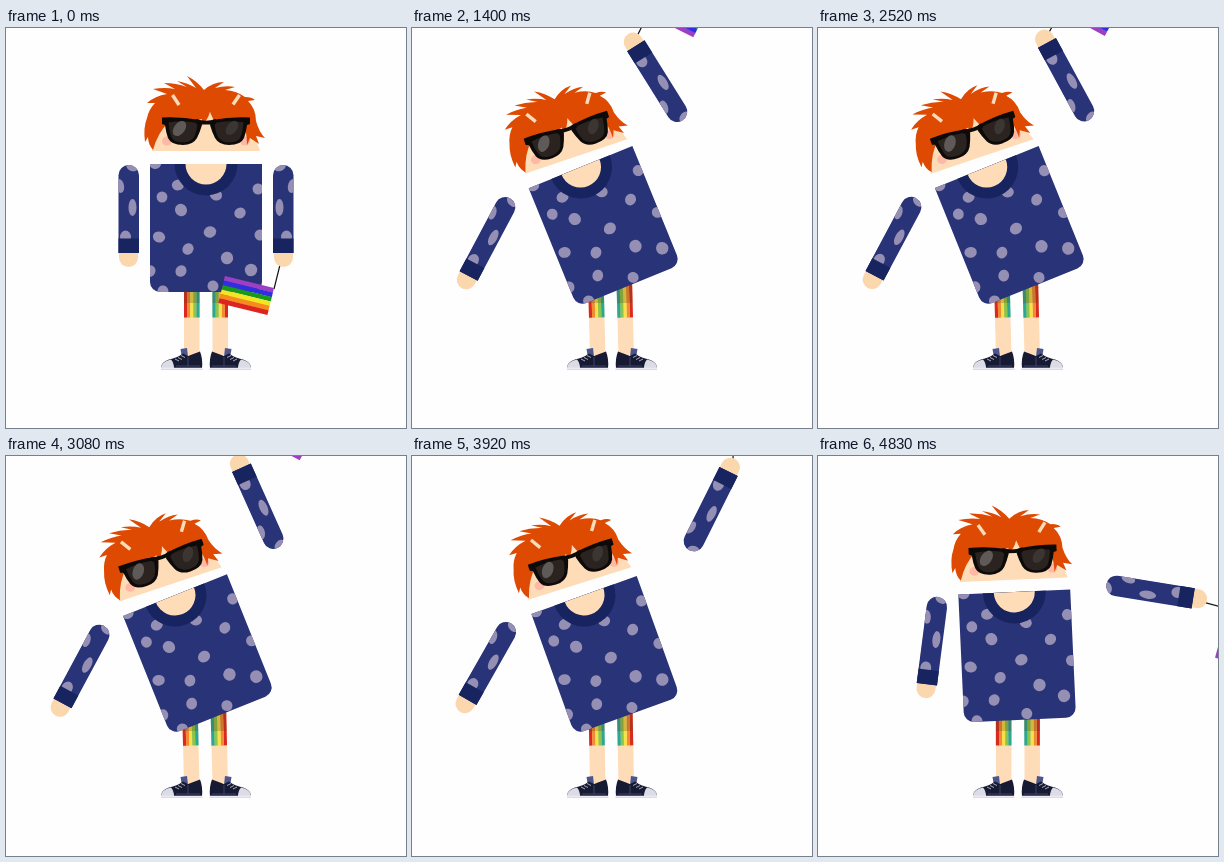
An HTML page with a canvas for the animation above (4.9 s loop, 400x400 px).

```html
<!DOCTYPE html>
<html lang="en">
<head>
<meta charset="utf-8">
<title>Flag waver</title>
<style>
html, body { margin: 0; width: 100%; height: 100%; overflow: hidden; background: #fefefe; }
canvas { display: block; width: 400px; height: 400px; }
</style>
</head>
<body>
<canvas id="stage" width="400" height="400"></canvas>
<script>
const ctx = document.getElementById('stage').getContext('2d');
const LOOP = 4900, STEP = 70;
const FIRST = 589, PERIOD = 541, LAST = FIRST + 7 * PERIOD, FLAG_LAG = 40;
const SKIN = '#ffdcb8', NAVY = '#293377', DARK = '#17245f', DOT = '#968fb4', HAIR = '#de4a02';

const clamp = x => Math.min(1, Math.max(0, x));
const ease = x => (x = clamp(x)) < 0.5 ? 4 * x ** 3 : 1 - 4 * (1 - x) ** 3;

// How far a part has left its rest pose, 0..1
const lift = (t, rise, fall) => t < LAST ? ease(t / rise) : 1 - ease((t - LAST) / fall);
const wave = t => t < FIRST || t > LAST ? 0 : (1 - Math.cos(2 * Math.PI * (t - FIRST) / PERIOD)) / 2;

function posed(px, py, dx, dy, deg, draw) {
  ctx.save();
  ctx.translate(px + dx, py + dy);
  ctx.rotate(deg * Math.PI / 180);
  ctx.translate(-px, -py);
  draw();
  ctx.restore();
}

function mirrored(draw) {
  ctx.save();
  ctx.translate(400, 0);
  ctx.scale(-1, 1);
  draw();
  ctx.restore();
}

function rect(x, y, w, h, color) {
  ctx.fillStyle = color;
  ctx.fillRect(x, y, w, h);
}

function fillPath(d, color) {
  ctx.fillStyle = color;
  ctx.fill(new Path2D(d));
}

function strokePath(d, color, width) {
  ctx.strokeStyle = color;
  ctx.lineWidth = width;
  ctx.stroke(new Path2D(d));
}

function oval(x, y, rx, ry, color, turn = 0) {
  ctx.fillStyle = color;
  ctx.beginPath();
  ctx.ellipse(x, y, rx, ry, turn, 0, 7);
  ctx.fill();
}

function box(x, y, w, h, radii) {
  ctx.beginPath();
  ctx.roundRect(x, y, w, h, radii);
}

function leg(lean) {
  posed(186, 328, 0, 0, lean, () => {
    rect(178, 255, 15.5, 72, SKIN);
    ['#d92a20', '#f08a35', '#f8e04a', '#8fc44a', '#2ba893'].forEach((color, i) =>
      rect(178 + i * 3.1, 255, 3.2, 34.5, color));
    rect(178, 255, 15.5, 20, 'rgba(90,60,20,.25)');
  });
}

function shoe() {
  fillPath('M174.5 321 L181 320 L182 329 L176 330 Z', '#4a568c');
  fillPath('M155 340 Q155 334 163 331.5 Q171 330 177 325.5 L182 328 L194 323.5 Q197 331 196 340 Z', '#171a33');
  fillPath('M155 340 Q155 333.5 165 331.5 Q168 335 168 340 Z', '#dcdce6');
  strokePath('M169 331 L173 333 M172 329.5 L176 331.5 M175 327.5 L179 329.5', '#e8e8f0', 0.7);
  strokePath('M182 329 L182 338 M170 338 L194 338', '#59618a', 0.6);
  strokePath('M155 340.3 H196.5', '#f2f0f8', 1.2);
  strokePath('M155 341.3 H196.5', '#d5c9e4', 0.9);
}

function lens() {
  fillPath(`M156 89.5 Q175 88.5 194 92 L196 97 Q194 104 191 110 Q187 117 177 117
    Q165 117 162 110 Q160 105 159 97 L156 96 Z`, '#0c0b0a');
  fillPath(`M162.5 94.5 Q177 92 191.5 95 Q191 104 187.5 110 Q183 114.5 177 114.5
    Q167 114.5 165 108 Q163 102 162.5 94.5 Z`, '#2b2320');
}

function head() {
  fillPath('M158 85 H242 Q247 104 254 123 H146 Q153 104 158 85 Z', SKIN);
  oval(161, 113, 5, 4.5, 'rgba(255,140,140,.45)');
  oval(239, 113, 5, 4.5, 'rgba(255,140,140,.45)');
  fillPath(`M147 122 Q142 116 142 109 L139 114 Q137 100 141 90 Q143 81 149 75 L141 75
    Q149 68 161 66 L147 61 Q159 59 169 61 L158 55 Q170 55 181 59 L171 53
    Q182 55 190 60 L181 48 Q191 53 198 62 Q207 54 218 54 L209 60
    Q220 57 229 59 L219 62 Q231 63 239 69 Q246 69 249 72 L242 73
    Q250 81 250 93 Q253 104 259 110 L250 108 L253 116 L244 110 L241 117
    Q241 104 237 94 L208 93 L204 84 Q201 94 194 98 L196 91 L184 94 L163 94
    Q152 104 147 122 Z`, HAIR);
  strokePath('M166.5 67 L173 77', '#f8dcba', 3.4);
  strokePath('M233.5 67 L227 76.5', '#f8dcba', 3.4);
  lens();
  mirrored(lens);
  oval(173.5, 100.5, 5.5, 8.5, '#5f5a57', 0.65);
  oval(226, 100, 5, 8, '#3c3633', 0.65);
  fillPath('M190 91 Q200 94.5 210 91 V96 Q200 97 190 96 Z', '#0c0b0a');
}

const BODY_DOTS = [[156, 169], [175, 182], [210, 167], [252, 161], [234, 185], [153, 209], [204, 204],
  [182, 221], [221, 230], [254, 207], [175, 243], [245, 242], [207, 258], [144, 243], [172, 157],
  [157, 263], [149, 135]];

function torso() {
  ctx.save();
  box(144, 136, 112, 128, [0, 0, 10, 10]);
  ctx.clip();
  rect(140, 130, 120, 140, NAVY);
  BODY_DOTS.forEach(([x, y], i) => oval(x, y, i % 5 === 1 || i === 8 ? 6.3 : 5.4, 5.6 + i % 3 * 0.3, DOT, i));
  oval(200, 136, 31.5, 31.5, DARK);
  oval(200, 136, 20.5, 20.5, SKIN);
  ctx.restore();
}

function arm() {
  ctx.fillStyle = '#fbd7ae';
  box(113, 215, 19, 24, 9.5);
  ctx.fill();
  ctx.save();
  box(112.5, 137, 20.5, 88, [10.2, 10.2, 0, 0]);
  ctx.clip();
  rect(112, 136, 22, 90, NAVY);
  oval(126, 139, 6, 4, DOT, 0.4);
  oval(114, 158, 4, 7, DOT, -0.2);
  oval(126.5, 179.5, 4, 8.5, DOT);
  oval(119.5, 209, 5.5, 6.5, DOT);
  rect(112, 210.5, 22, 15, DARK);
  ctx.restore();
}

function flag() {
  strokePath('M277 230 L273.7 238 L268 261', '#151515', 1.2);
  ctx.save();
  ctx.translate(268, 260);
  ctx.rotate(Math.atan2(12, 49));
  ['#9d3fc4', '#2f2fe0', '#1b991d', '#f4e522', '#f58c1b', '#dc2420'].forEach((color, i) =>
    rect(-50.5, i * 4.6, 50.5, 4.8, color));
  ctx.restore();
}

function draw(t) {
  const w = wave(t);
  const q = lift(t, 600, 672), qLeft = lift(t, 600, 750);
  const qArm = lift(t, 620, 972), qFlag = lift(t, 890, 880);
  const armTurn = -qArm * (136.5 + 75.5 * w);
  const flagTurn = -qFlag * (196 - 30.5 * wave(t - FLAG_LAG));
  const lean = -q * (1 + 0.5 * w);

  rect(0, 0, 400, 400, '#fefefe');
  leg(lean);
  mirrored(() => leg(-lean));
  shoe();
  mirrored(shoe);
  posed(200, 97, -q * (38.8 + 5.5 * w), q * (5.2 + 1.7 * w), -q * (17.2 + 1.4 * w), head);
  posed(200, 200, -q * (6 + 1.3 * w), -q * (0.5 + 1.2 * w), -q * (19.1 + 3.1 * w), torso);
  posed(122.5, 147, -q * (28.5 + w), q * (28 + 4 * w), qLeft * (30 - 2 * w), arm);
  posed(280.5, 127, q * (4 * w - 11.5), -q * (25.6 - 1.2 * w), armTurn, () => {
    posed(277.5, 231, 0, 0, flagTurn - armTurn, flag);
    mirrored(arm);
  });
}

const start = performance.now();
function tick() {
  const t = (performance.now() - start) % LOOP;
  draw(Math.floor(t / STEP) * STEP);
  requestAnimationFrame(tick);
}
tick();
</script>
</body>
</html>
```
